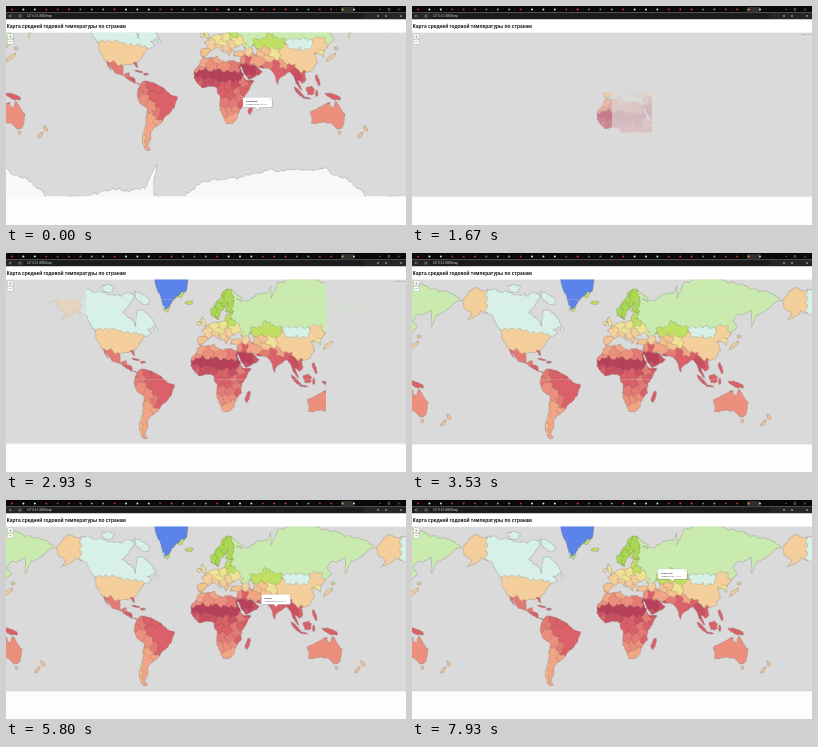
These frames come from a looping animation (400x219 px, 8 s). An HTML page with a canvas:

```html
<!DOCTYPE html>
<html lang="ru">
<head>
<meta charset="utf-8">
<title>Карта средней годовой температуры</title>
<style>
html, body { margin: 0; width: 100%; height: 100%; overflow: hidden; background: #fdfdfd; }
canvas, svg { position: fixed; left: 0; top: 0; width: 100%; height: 100%; }
text { font-family: "Liberation Sans", Arial, sans-serif; }
</style>
</head>
<body>
<canvas id="map"></canvas>
<svg viewBox="0 0 400 219" preserveAspectRatio="none">
  <rect width="400" height="6.6" fill="#080808"/>
  <rect y="6.6" width="400" height="6.9" fill="#262626"/>
  <g id="tabs"></g>
  <rect x="18" y="7.6" width="340" height="4.8" rx="2.4" fill="#1b1b1b"/>
  <circle cx="14" cy="10" r="1.2" fill="none" stroke="#aaa" stroke-width=".5"/>
  <path d="M6 10H3l1.5-1.2M3 10l1.5 1.2" fill="none" stroke="#aaa" stroke-width=".5"/>
  <text x="21" y="11" font-size="2.8" fill="#d5d5d5">127.0.0.1:8000/map</text>
  <g fill="#999"><circle cx="372" cy="10" r=".9"/><circle cx="380" cy="10" r=".9"/><circle cx="395" cy="10" r=".9"/></g>
  <rect y="13.5" width="400" height="12.8" fill="#fff"/>
  <text x=".8" y="21.7" font-size="4.9" font-weight="700" fill="#111">Карта средней годовой температуры по странам</text>
  <rect x="1.5" y="28" width="5.5" height="10" rx=".6" fill="#fff" stroke="#aaa" stroke-width=".4"/>
  <path d="M3.2 30.5h2.2M4.3 29.4v2.2M3.2 35.5h2.2M1.5 33h5.5" stroke="#444" stroke-width=".4"/>
  <text id="note" x="399" y="28.5" font-size="2.2" text-anchor="end" fill="#777">Слой: год</text>
  <path id="edge" d="M0 190.7H400" stroke-width=".7"/>
  <g id="popups"></g>
</svg>
<script>
const LOOP = 8000, WORLD = 320, TOP = 26.3, BOTTOM = 190.5, WATER = '#dadada';
const LINE = 'rgba(90,70,70,.6)';
const color = {
  mint: '#d8f1e8', pale: '#c9ebb0', green: '#a9d950', lime: '#bfe062', lemon: '#efe195',
  sand: '#f4cf9b', peach: '#f4c18f', coral: '#f1a585', salmon: '#ec8f7c', rose: '#e37a74',
  red: '#db6067', crimson: '#cb5061', wine: '#b9405a', blue: '#5b83ea'
};

// Coasts as lon lat pairs; finer detail comes from midpoint displacement.
const northAmerica = '-168 66 -156 71 -128 70 -96 68 -82 69 -81 67 -94 60 -82 55 -79 51 -77 61 -70 61 -65 59 -56 52 -66 49 -61 46 -70 43 -76 35 -81 31 -80 25.5 -84 30 -97 28 -96 18 -90 21 -88 16 -84 15 -83 10 -77 8 -85 10 -94 16 -105 20 -113 31 -109 23 -117 33 -124 42 -124 48 -134 58 -147 61 -163 55 -157 59 -166 62';
const southAmerica = '-77 8 -72 12 -62 10 -51 4 -44 -3 -35 -6 -39 -18 -48 -26 -58 -36 -65 -41 -66 -48 -69 -52 -66 -55 -72 -54 -75 -48 -71 -30 -70 -18 -76 -14 -81 -5 -80 1';
const africa = '-17 15 -17 21 -10 31 -6 35.5 10 37 11 34 20 31 22 33 34 31 39 16 43 12 51 12 40 -4 40 -15 35 -20 32 -28 26 -34 19 -34 12 -18 13 -7 9 0 9 4 5 6 -8 4 -13 9';
const eurasia = '-9 37 -9 43 -1 44 -5 48.5 8 54 21 55 23 59 30 60 22 60.5 25 65.5 17 61 14 55.5 6 58 5 62 18 69.5 30 70 41 67 34 66.5 44 66 67 69 73 72 73 67 81 73 104 77 140 72.5 180 69 190 66 163 59 157 51 157 61 142 59 136 54.5 141 51 129 41 129 36 125 39 118 39 122 31 117 23.5 107 21 109 13 105 9 100 13 104 1.5 98 9 95 17 91 22 80 15 77.5 8 73 20 67 25 57 26 49 30 56 25 60 22 45 13 35 28 36 36.5 27 37 29 41 41 41.5 38 47 28 44 23 37 19.5 41 13 45 18 40 9 44.5 -1 39 -5 36';
const greenland = '-60 76 -52 69 -48 61 -43 60 -38 66 -22 70 -19 78';
const australia = '114 -22 129 -15 136 -12 136 -16 140 -18 142 -11 153 -25 150 -37 144 -39 137 -33 124 -33 115 -34';
const antarctica = '-180 -78 -100 -73 -72 -73 -58 -63 -62 -75 -35 -78 -10 -71 55 -67 135 -66 168 -73 180 -78 180 -84 -180 -84';
// Islands: lon, lat, two radii in pixels, tilt in degrees.
const islands = [
  '-3 54 2 5 -20', '-8 53 1.6 2 0', '-19 65 3.6 1.8 0', '-72 67 9 4 35', '-110 71 6 4 0', '-56 49 2 1.6 0',
  '-79 22 4 .8 12', '-71 19 2.5 1 0', '47 -19 1.9 6 15', '101 -1 7 1.5 45', '110 -7.3 4 .7 8', '114 1 4 4.5 0',
  '121 -2 1.2 3 0', '140 -5.5 8 2.6 18', '122 13 1.5 5.5 -20', '137 36 6 1.5 -40', '143 43.5 2 1.6 0',
  '176 -38.5 1.4 3 -30', '170 -44 1.3 4 40', '146.5 -42 1.4 1.4 0'];
const caspian = '51 42 2.3 5.5 -15';

// Countries as colour and seed points; land goes to the nearest seed.
const americas = [
  'blue -42 72 -30 74', 'sand -152 64', 'mint -130 64 -110 57 -105 68 -85 53 -88 66 -70 52 -72 66',
  'sand -110 40 -99 36 -88 39 -78 38', 'rose -108 23 -99 19 -90 18', 'red -90 14', 'red -84 11', 'red -79 22',
  'rose -74 4', 'red -66 7', 'red -58 4', 'rose -79 -1', 'salmon -75 -9', 'salmon -65 -17', 'rose -58 -23',
  'red -61 -4 -52 -4 -42 -8 -54 -13 -47 -20 -52 -27', 'coral -56 -34',
  'coral -66 -28 -66 -37 -67 -47', 'peach -74 -28 -76 -37 -77 -47'];
const africans = [
  'coral -6 32', 'salmon -13 25', 'wine -11 20', 'wine -3 17', 'salmon 2 29', 'wine 9 17', 'coral 9.5 34.5',
  'salmon 17 28', 'rose 30 27', 'wine 18 16', 'wine 29 16', 'crimson -14 14', 'red -10 9.5', 'crimson -6 7',
  'crimson -2 12.5', 'crimson 0 7.5', 'crimson 8 9', 'red 13 5', 'red 21 7', 'crimson 30 8', 'rose 39 9',
  'red 47 6', 'red 38 1', 'rose 32.5 1', 'red 23 -3', 'red 15 -1', 'rose 35 -6', 'rose 17 -12', 'rose 27 -14',
  'red 37 -15', 'salmon 30 -19', 'salmon 16 -22', 'salmon 23.5 -22', 'coral 24 -31 30 -27', 'red 47 -19'];
const europeans = [
  'lime -19 65', 'peach -4 39.5', 'sand 2 47', 'lemon -2 53', 'lemon -8 53', 'lemon 10 51', 'lemon 19 52',
  'lemon 15 48', 'sand 11 43.5 15.5 39', 'sand 20 44', 'peach 22 39.5', 'sand 25 46', 'lemon 31 49 37 48',
  'lime 28 54', 'lime 25 57.5', 'green 8 61 14 68', 'green 15 61', 'green 26 63 27 67', 'peach 34 39'];
const asians = [
  'pale 33 57 34 63 34 68 42 50 45 46 55 54 67 60 80 56 96 54 110 54 125 57 138 50 160 60',
  'sand 44 41.5', 'lime 55 47 67 48 77 46', 'lemon 73 40', 'peach 63 41', 'peach 58 39', 'peach 66 34',
  'coral 50 33 58 33', 'red 43 33', 'salmon 38 34', 'wine 39 26 47 23', 'crimson 46 15', 'crimson 57 21',
  'rose 67 29', 'red 76 26 79 16 83 22', 'red 90 24', 'coral 84 28.3', 'mint 96 47 108 47',
  'sand 85 41 88 33 97 39 110 38 124 46 117 34 102 27 112 27', 'crimson 96 21', 'crimson 101 16', 'red 106 16',
  'red 102 3', 'red 103 -3 115 -2', 'red 140 -6', 'red 122 13', 'lemon 127 37', 'sand 138 37',
  'salmon 134 -25 120 -27 142 -16 147 -35', 'peach 147 -46', 'peach 172 -41'];

const $ = id => document.getElementById(id);
const fract = v => v - Math.floor(v);
const numbers = text => text.split(' ').map(Number);
const pairs = n => n.flatMap((v, i) => i % 2 ? [] : [[v, n[i + 1]]]);
const project = ([lon, lat]) =>
  [lon * WORLD / 360, -Math.log(Math.tan(Math.PI * (0.25 + lat / 360))) * WORLD / (2 * Math.PI)];

function roughen(a, b, depth = 5) {
  const len = Math.hypot(b[0] - a[0], b[1] - a[1]);
  if (!depth || len < 1.2) return [a];
  const x = (a[0] + b[0]) / 2, y = (a[1] + b[1]) / 2, k = Math.min(len, 8) * 0.26;
  const seed = Math.sin(x * 12.9898 + y * 78.233) * 43758.5;
  const mid = [x + (fract(seed) - 0.5) * k, y + (fract(seed * 7.3) - 0.5) * k * 0.8];
  return [...roughen(a, mid, depth - 1), ...roughen(mid, b, depth - 1)];
}

function coastPath(text) {
  const pts = pairs(numbers(text)), path = new Path2D();
  pts.flatMap((p, i) => roughen(p, pts[(i + 1) % pts.length])).forEach(p => path.lineTo(...project(p)));
  path.closePath();
  return path;
}

function islandPath(text) {
  const [lon, lat, rx, ry, tilt] = numbers(text), [cx, cy] = project([lon, lat]);
  const path = new Path2D(), turn = tilt * Math.PI / 180;
  for (let i = 0; i < 20; i++) {
    const a = i * Math.PI / 10, r = 0.8 + 0.4 * fract(Math.sin(i * 9.7 + lon) * 437);
    const x = rx * r * Math.cos(a), y = ry * r * Math.sin(a);
    path.lineTo(cx + x * Math.cos(turn) - y * Math.sin(turn), cy + x * Math.sin(turn) + y * Math.cos(turn));
  }
  path.closePath();
  return path;
}

const WX = 165, WY = 115, WW = 345, WH = 235, Q = 3;
const world = document.createElement('canvas');
world.width = WW * Q;
world.height = WH * Q;
const wg = world.getContext('2d', { willReadFrequently: true });

// Colours every land pixel by its nearest seed and darkens the borders.
function colorCountries() {
  const image = wg.getImageData(0, 0, world.width, world.height), px = image.data;
  const shades = [], sx = [], sy = [], owner = [];
  [...americas, ...africans, ...europeans, ...asians].forEach((text, id) => {
    const [name, ...rest] = text.split(' ');
    shades.push([1, 3, 5].map(i => parseInt(color[name].slice(i, i + 2), 16)));
    pairs(rest.map(Number)).map(project).forEach(([x, y]) => { sx.push(x); sy.push(y); owner.push(id); });
  });
  const ids = new Int16Array(world.width * world.height).fill(-1);
  for (let p = 0; p < ids.length; p++) {
    if (!px[p * 4 + 3]) continue;
    const u = p % world.width / Q - WX, v = Math.floor(p / world.width) / Q - WY;
    const x = u + 0.9 * Math.sin(v * 0.8 + u * 0.3) + 0.4 * Math.sin(v * 2.3 - u);
    const y = v + 0.9 * Math.sin(u * 0.9 - v * 0.2) + 0.4 * Math.sin(u * 2.1 + v);
    let best = Infinity;
    for (let i = 0; i < sx.length; i++) {
      const d = (x - sx[i]) ** 2 + (y - sy[i]) ** 2;
      if (d < best) { best = d; ids[p] = owner[i]; }
    }
  }
  const differs = (a, b) => b >= 0 && a !== b;
  ids.forEach((id, p) => {
    if (id < 0) return;
    const mix = differs(id, ids[p + 1]) || differs(id, ids[p + world.width]) ? 0.5 : 0;
    shades[id].forEach((s, i) => px[p * 4 + i] = s + (85 - s) * mix);
  });
  wg.putImageData(image, 0, 0);
}

wg.scale(Q, Q);
wg.translate(WX, WY);
const coasts = [...[northAmerica, southAmerica, africa, eurasia, greenland, australia].map(coastPath),
  ...islands.map(islandPath)];
const sea = islandPath(caspian), ice = coastPath(antarctica);
coasts.forEach(c => wg.fill(c));
wg.globalCompositeOperation = 'destination-out';
wg.fill(sea);
wg.globalCompositeOperation = 'source-over';
colorCountries();
wg.fillStyle = '#f8f8f8';
wg.fill(ice);
wg.strokeStyle = LINE;
wg.lineWidth = 0.35;
wg.lineJoin = 'round';
[...coasts, sea, ice].forEach(c => wg.stroke(c));

// Tiles load from the centre of the view outwards.
const TILE = 40, tiles = [];
for (let y = 6.5; y < BOTTOM; y += TILE)
  for (let x = 0; x < 400; x += TILE)
    tiles.push({ x, y, d: Math.hypot(x - 180, y - 86.5) });
tiles.sort((a, b) => a.d - b.d);
tiles.forEach((t, i) => t.start = i < 32 ? 1610 + 40 * i : 2890 + 32 * (i - 32));

const RELOAD = 1450, LOADED = 3560;
const canvas = $('map'), ctx = canvas.getContext('2d');

function drawWorld(x, y) {
  for (let k = -1; k <= 1; k++)
    ctx.drawImage(world, x + k * WORLD - WX, y - WY, WW, WH);
}

function drawTile({ x, y, start }, t) {
  if (t <= start) return;
  ctx.save();
  ctx.globalAlpha = Math.min(1, (t - start) / 100);
  ctx.beginPath();
  ctx.rect(x, y, TILE, TILE);
  ctx.clip();
  drawWorld(200, 126.5);
  ctx.restore();
}

function drawMap(t) {
  const dpr = devicePixelRatio || 1, w = Math.round(innerWidth * dpr), h = Math.round(innerHeight * dpr);
  if (canvas.width !== w || canvas.height !== h) { canvas.width = w; canvas.height = h; }
  ctx.setTransform(w / 400, 0, 0, h / 219, 0, 0);
  ctx.imageSmoothingQuality = 'high';
  ctx.fillStyle = '#fdfdfd';
  ctx.fillRect(0, 0, 400, 219);
  ctx.save();
  ctx.beginPath();
  ctx.rect(0, TOP, 400, BOTTOM - TOP);
  ctx.clip();
  ctx.fillStyle = WATER;
  ctx.fillRect(0, TOP, 400, BOTTOM - TOP);
  if (t < RELOAD) drawWorld(203, 85.5);
  else if (t >= LOADED) drawWorld(200, 126.5);
  else tiles.forEach(tile => drawTile(tile, t));
  ctx.restore();
}

const popups = [
  { name: 'Маврикий', temp: '22.4', x: 251.5, y: 104, from: -500, to: RELOAD, fade: 1 },
  { name: 'Индия', temp: '24.6', x: 270, y: 107, from: 5330, to: 6800, fade: 200 },
  { name: 'Казахстан', temp: '7.1', x: 260.5, y: 81.5, from: 6850, to: 9000, fade: 200 }
];
const bubble = 'M-13.5-12.5h27q1 0 1 1v8q0 1-1 1H2L0 0l-2-2.5h-11.5q-1 0-1-1v-8q0-1 1-1z';
$('popups').innerHTML = popups.map(p => `<g transform="translate(${p.x} ${p.y})">
  <path d="${bubble}" transform="translate(.3 .5)" opacity=".3"/>
  <path d="${bubble}" fill="#fff" stroke="#bbb" stroke-width=".2"/>
  <text x="-11.5" y="-8" font-size="2.3" font-weight="700" fill="#333">${p.name}</text>
  <text x="-11.5" y="-4.8" font-size="2.2" fill="#555">Температура: ${p.temp}°C</text>
  <path d="M12-11.3l1 1m0-1l-1 1" stroke="#888" stroke-width=".3"/></g>`).join('');
const popupNodes = [...$('popups').children];

const tabColors = ['#c33', '#ddd', '#d44', '#999', '#e8e8e8', '#b33', '#777'];
let tabs = '<rect x="335" y="1" width="13" height="5.6" rx="1" fill="#303030"/>';
for (let i = 0; i < 31; i++) {
  const x = 6 + i * 11.4, fill = i === 29 ? '#e8a040' : tabColors[(i * 3 + i % 4) % 7];
  tabs += `<circle cx="${x}" cy="3.4" r="1" fill="${fill}"/><path d="M${x + 5.7} 2.2v2.4" stroke="#444" stroke-width=".3"/>`;
}
$('tabs').innerHTML = tabs + '<path d="M373 3.4h2M382 2.5h1.8v1.8H382zM392 2.5l2 2m0-2l-2 2" fill="none" stroke="#bbb" stroke-width=".4"/>';

function frame() {
  const t = performance.now() % LOOP;
  const loading = t >= RELOAD && t < LOADED - 60;
  drawMap(t);
  $('note').style.display = loading ? '' : 'none';
  $('edge').setAttribute('stroke', loading ? '#c9e6df' : t < RELOAD ? 'none' : '#bdbdbd');
  popups.forEach((p, i) => {
    const alpha = Math.min((t - p.from) / p.fade, (p.to - t) / p.fade, 1);
    popupNodes[i].setAttribute('opacity', Math.max(0, alpha));
  });
  requestAnimationFrame(frame);
}
frame();
</script>
</body>
</html>
```
